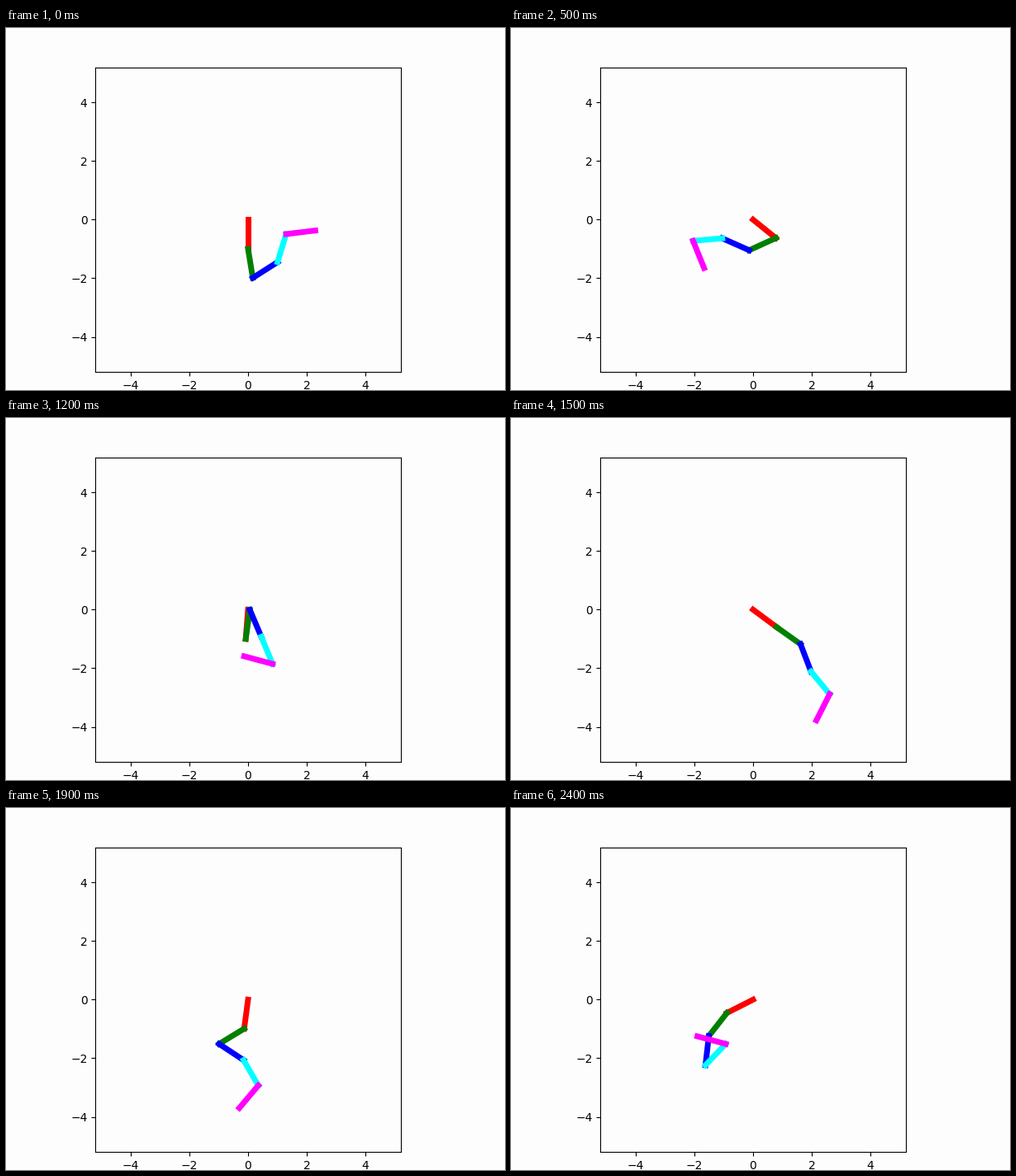
Recreate the animation shown at these times as a matplotlib script. Size 604 by 439 pixels, loop 3 s.

```python
import numpy as np
import matplotlib.pyplot as plt
from matplotlib.animation import FuncAnimation

W, H, DPI = 604, 439, 100
EPS = 1e-6  # keeps the pixel size from rounding down
FRAMES, STEP_MS = 30, 100
PAPER = "#fefdfe"
COLORS = ["red", "green", "blue", "cyan", "magenta"]

# Step -> angle of each link from straight down, in degrees
POSES = {
    0: (0, 9.3, 122.5, 163, 97),
    5: (51, -65.5, -114, 275, 22),
    9: (-22, 17, -9.5, 287.5, 78),
    12: (-4.5, 172, 23, 382.5, 255),
    17: (63.3, -43.7, 29.5, 395.4, 343.3),
    21: (-77.3, -51.6, 123.7, 401.4, 285),
    24: (-63, -38, 353.5, 496.4, 255),
}
STEPS = np.array(list(POSES), dtype=float)
ANGLES = np.radians(list(POSES.values()))
SPEEDS = np.gradient(ANGLES, STEPS, axis=0)


def angles_at(step):
    """Smooth swing between poses (cubic Hermite); rests on the last one."""
    step = min(step, STEPS[-1])
    i = min(np.searchsorted(STEPS, step, side="right") - 1, len(STEPS) - 2)
    h = STEPS[i + 1] - STEPS[i]
    u = (step - STEPS[i]) / h
    v = 1 - u
    return (v * v * ((1 + 2 * u) * ANGLES[i] + u * h * SPEEDS[i])
            + u * u * ((1 + 2 * v) * ANGLES[i + 1] - v * h * SPEEDS[i + 1]))


def joints(angles):
    """Chain of unit links hanging from the origin."""
    x = np.concatenate([[0], np.cumsum(np.sin(angles))])
    y = np.concatenate([[0], -np.cumsum(np.cos(angles))])
    return x, y


plt.rcParams["font.family"] = "DejaVu Sans"
fig = plt.figure(figsize=((W + EPS) / DPI, (H + EPS) / DPI), dpi=DPI,
                 facecolor=PAPER)
left, bottom, side = 108.18, 21.8, 369.6
ax = fig.add_axes([left / W, bottom / H, side / W, side / H], facecolor=PAPER)
ticks = range(-4, 5, 2)
ax.set(xlim=(-5.2, 5.2), ylim=(-5.2, 5.2), xticks=ticks, yticks=ticks)
links = [ax.plot([], [], color=c, lw=5, solid_capstyle="projecting")[0]
         for c in COLORS]


def update(frame):
    x, y = joints(angles_at(frame))
    for i, link in enumerate(links):
        link.set_data(x[i:i + 2], y[i:i + 2])
    return links


anim = FuncAnimation(fig, update, frames=FRAMES, interval=STEP_MS,
                     repeat=True, repeat_delay=0)
plt.show()
```
